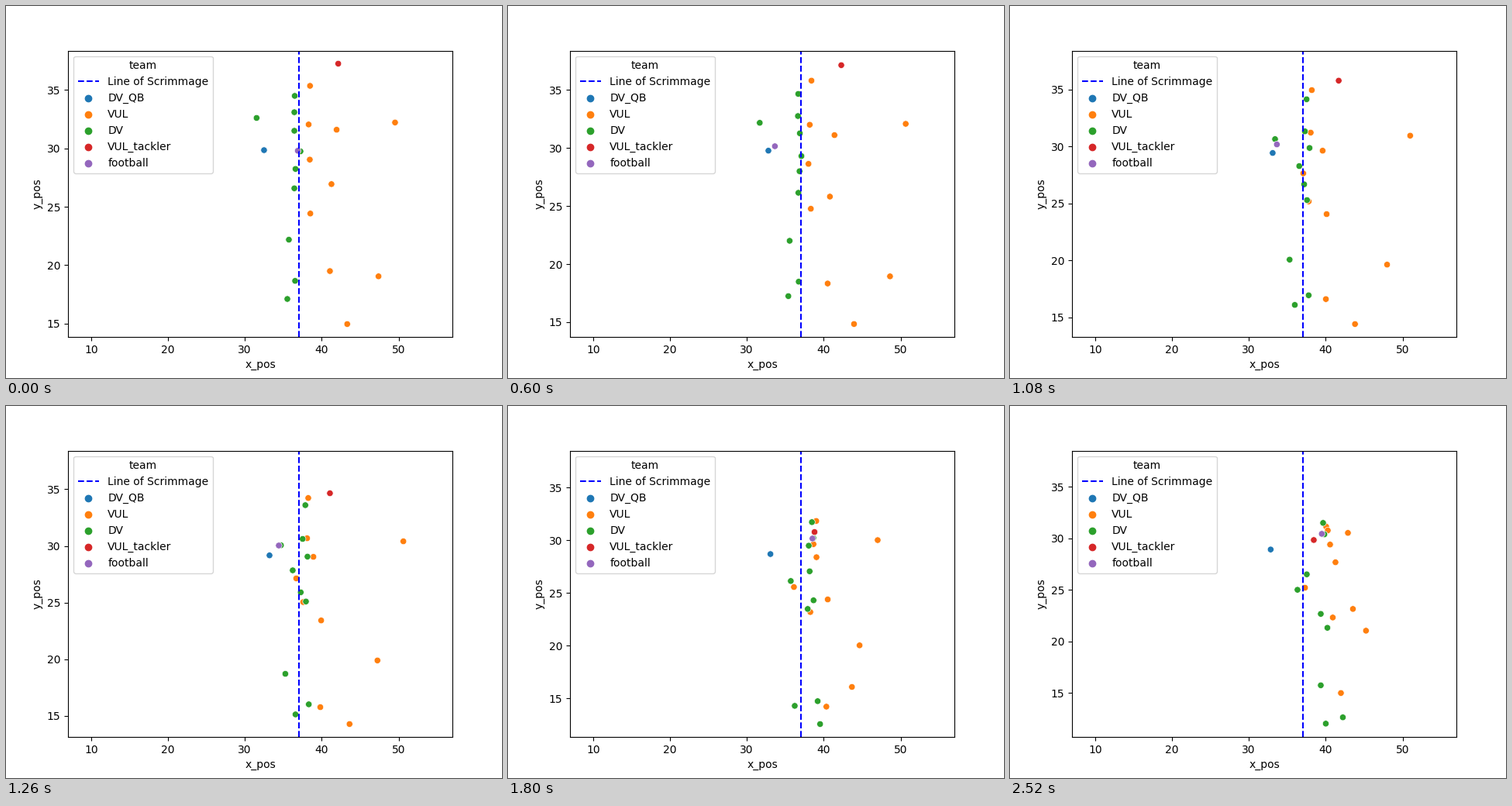
Animation, 640 px wide and 480 px high, one loop 2.58 s. Source, as a matplotlib script:

```python
import numpy as np
import matplotlib.pyplot as plt
from matplotlib.animation import FuncAnimation

FRAMES = 43
INTERVAL = 60
KNOTS = [0, 6, 14, 21, 25, 35, 42]
COLORS = {
    "DV_QB": "tab:blue",
    "VUL": "tab:orange",
    "DV": "tab:green",
    "VUL_tackler": "tab:red",
    "football": "tab:purple",
}

tracks, colors = [], []


def smooth(knots, values):
    """Cubic Hermite curve through the knots, sampled at every frame."""
    k, v = np.array(knots, float), np.array(values, float)
    slope = np.gradient(v, k, edge_order=2)
    t = np.arange(FRAMES)
    i = np.clip(np.searchsorted(k, t, side="right") - 1, 0, len(k) - 2)
    h = k[i + 1] - k[i]
    u = (t - k[i]) / h
    return ((1 + 2 * u) * (1 - u) ** 2 * v[i] + u * (1 - u) ** 2 * h * slope[i]
            + u * u * (3 - 2 * u) * v[i + 1] + u * u * (u - 1) * h * slope[i + 1])


def add(team, xs, ys, knots=KNOTS):
    tracks.append([smooth(knots, xs), smooth(knots, ys)])
    colors.append(COLORS[team])


# Player paths in yards, drawn in this order.
add("DV_QB", [32.50, 32.71, 32.91, 33.21, 33.21, 32.91, 32.84],
    [29.85, 29.78, 29.69, 29.17, 28.79, 28.79, 28.93])

add("VUL", [38.48, 38.55, 38.25, 38.25, 38.55, 39.52, 40.06],
    [35.36, 35.69, 35.63, 34.23, 33.15, 30.96, 31.15])
add("VUL", [38.30, 38.30, 38.07, 38.10, 38.28, 39.23, 40.27],
    [32.05, 32.06, 31.77, 30.68, 29.90, 29.89, 30.78])
add("VUL", [41.94, 41.85, 40.69, 38.92, 38.65, 39.79, 40.57],
    [31.60, 31.55, 30.45, 29.04, 28.48, 28.71, 29.41])
add("VUL", [49.54, 50.21, 50.95, 50.62, 49.29, 44.80, 42.89],
    [32.22, 32.26, 31.69, 30.41, 30.01, 30.26, 30.54])
add("VUL", [38.45, 38.31, 37.61, 36.69, 36.28, 36.36, 37.31],
    [29.04, 28.90, 28.22, 27.14, 26.44, 25.00, 25.22])
add("VUL", [41.27, 41.04, 40.52, 39.93, 40.04, 41.04, 41.27],
    [26.94, 26.36, 25.11, 23.43, 23.21, 26.09, 27.69])
add("VUL", [38.52, 38.45, 38.13, 37.59, 37.58, 39.33, 40.92],
    [24.42, 24.48, 25.05, 25.05, 24.39, 22.24, 22.33])
add("VUL", [41.07, 40.67, 40.35, 39.82, 39.74, 41.20, 41.98],
    [19.49, 18.84, 17.65, 15.78, 14.79, 14.24, 15.00])
add("VUL", [47.39, 48.27, 48.61, 47.25, 46.01, 43.76, 43.54],
    [19.04, 18.87, 19.17, 19.90, 19.86, 20.76, 23.16])
add("VUL", [43.32, 43.75, 44.00, 43.62, 43.41, 44.26, 45.24],
    [14.95, 14.85, 14.78, 14.29, 14.65, 18.10, 21.05])

add("DV", [31.53, 31.58, 32.16, 34.70, 36.79, 39.66, 39.54],
    [32.61, 32.48, 31.63, 30.06, 30.00, 30.46, 30.44])
add("DV", [36.49, 36.51, 37.01, 37.87, 38.15, 38.85, 39.66],
    [34.50, 34.54, 34.61, 33.60, 32.70, 31.16, 31.51])
add("DV", [36.44, 36.47, 36.92, 37.52, 37.59, 38.75, 39.83],
    [33.10, 33.04, 32.22, 30.62, 29.86, 29.61, 30.40])
add("DV", [36.44, 36.47, 37.44, 38.15, 38.25, 37.95, 37.54],
    [31.51, 31.48, 30.78, 29.06, 27.98, 26.56, 26.52])
add("DV", [37.24, 37.17, 36.94, 36.23, 35.83, 35.88, 36.33],
    [29.75, 29.68, 28.79, 27.85, 27.20, 25.25, 25.02])
add("DV", [36.59, 36.64, 37.09, 37.27, 37.39, 38.75, 40.22],
    [28.24, 28.21, 27.54, 25.91, 24.88, 22.27, 21.33])
add("DV", [36.44, 36.51, 37.04, 37.95, 38.25, 39.06, 39.36],
    [26.58, 26.55, 25.65, 25.10, 24.97, 23.48, 22.68])
add("DV", [35.73, 35.66, 35.46, 35.27, 35.46, 37.51, 40.01],
    [22.18, 22.14, 21.46, 18.72, 16.69, 12.57, 12.03])
add("DV", [36.54, 36.59, 37.09, 38.32, 38.85, 39.36, 39.36],
    [18.65, 18.61, 18.06, 16.03, 15.07, 15.00, 15.75])
add("DV", [35.53, 35.48, 35.50, 36.59, 37.80, 41.07, 42.23],
    [17.10, 17.14, 17.05, 15.14, 13.71, 12.13, 12.64])

add("VUL_tackler", [42.15, 42.21, 42.18, 41.07, 39.86, 38.28, 38.45],
    [37.26, 37.18, 36.77, 34.65, 32.63, 29.76, 29.85])
# The snap needs two extra knots.
add("football", [36.89, 36.82, 36.49, 33.65, 33.43, 34.42, 36.64, 39.53, 39.49],
    [29.80, 29.84, 29.86, 30.15, 30.34, 30.04, 30.08, 30.27, 30.45],
    [0, 5, 6, 10, 14, 21, 25, 35, 42])

paths = np.array(tracks)
top = paths[:, 1].max()
lows = -np.maximum.accumulate((-paths[:, 1]).max(axis=0))

fig, ax = plt.subplots(figsize=(6.4, 4.8), dpi=100)
line = ax.axvline(37, color="blue", linestyle="--", label="Line of Scrimmage")
dots = ax.scatter(paths[:, 0, 0], paths[:, 1, 0], s=36, c=colors,
                  edgecolors="white", linewidths=0.48)
keys = [ax.scatter([], [], color=c, label=name) for name, c in COLORS.items()]
ax.legend(handles=[line, *keys], title="team", loc="upper left")
ax.set(xlim=(7, 57), xlabel="x_pos", ylabel="y_pos")


def draw(i):
    # The lower limit only ever grows to include the lowest point so far.
    margin = 0.05 * (top - lows[i])
    ax.set_ylim(lows[i] - margin, top + margin)
    dots.set_offsets(paths[:, :, i])
    return [dots]


anim = FuncAnimation(fig, draw, frames=FRAMES, interval=INTERVAL, repeat=True)
plt.show()
```
